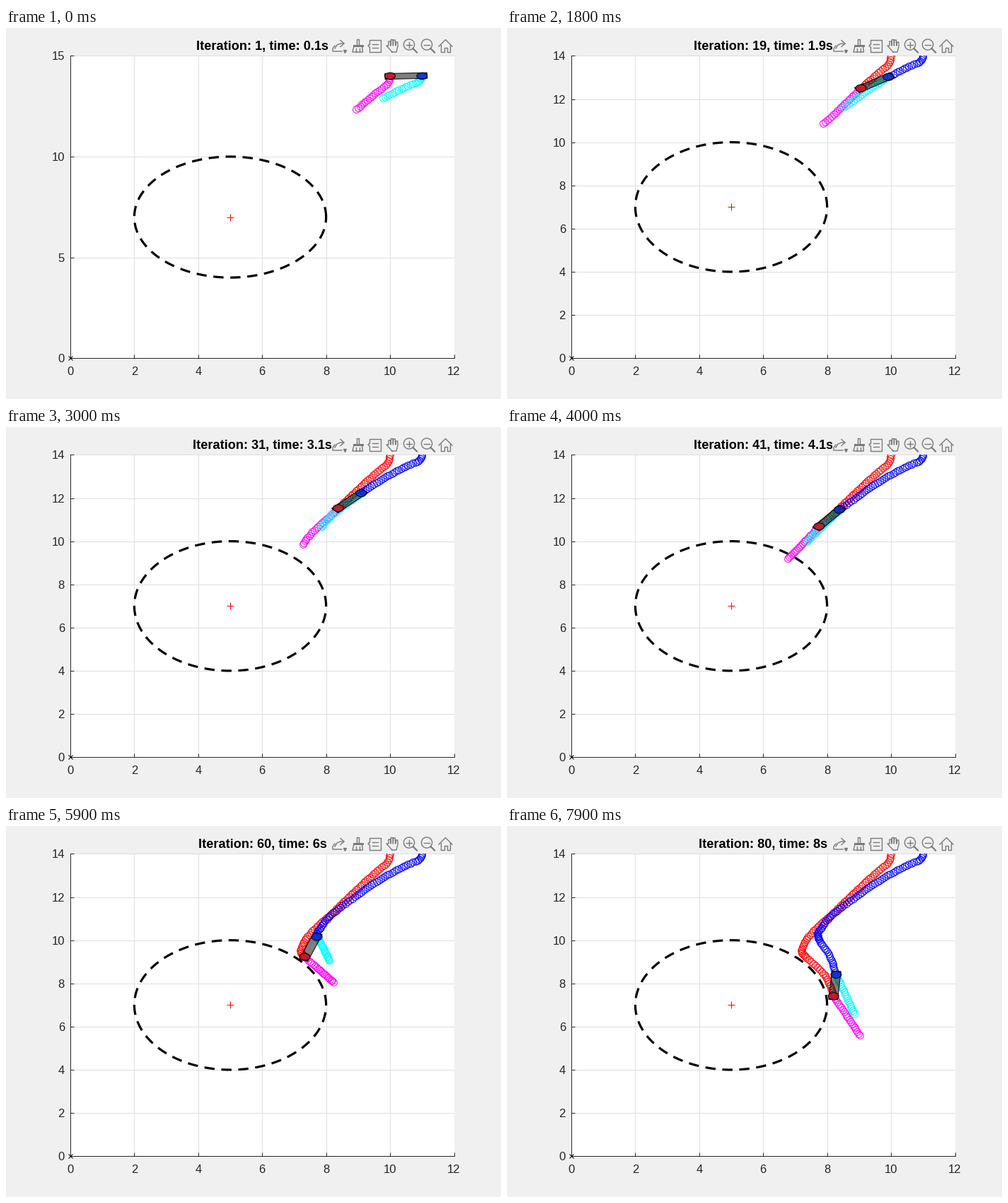
Animation of 700 by 525 pixels, one loop 8 s. Source, as a matplotlib script:

```python
import numpy as np
import matplotlib.pyplot as plt
from matplotlib.animation import FuncAnimation
from matplotlib.patches import Circle, Polygon, Rectangle

W, H, DPI = 700, 525, 100
PX = 72 / DPI  # points per pixel
LINE = 0.99 * PX
STEPS, HORIZON = 80, 20
BACK, INK, ICON = "#f0f0f0", "#262626", "#7a7a7a"
RADIUS, HALF_LENGTH, HALF_WIDTH = 0.165, 0.66, 0.14
plt.rcParams["font.family"] = "Liberation Sans"

# step, x, y of the front wheel
ROUTE = np.array([
    (0, 10, 14), (4, 9.92, 13.62), (9, 9.6, 13.22), (30, 8.38, 11.53),
    (50, 7.28, 9.85), (55, 7.2, 9.45), (59, 7.33, 9.23), (69, 7.93, 8.37),
    (79, 8.2, 7.41),
])


def front_at(t):
    """Cubic Hermite curve through the route."""
    t = np.atleast_1d(np.asarray(t, float))
    kt, kv = ROUTE[:, 0], ROUTE[:, 1:]
    slope = np.gradient(kv, kt, axis=0)
    i = np.clip(np.searchsorted(kt, t, side="right") - 1, 0, len(kt) - 2)
    h = (kt[i + 1] - kt[i])[:, None]
    u = (t - kt[i])[:, None] / h
    return ((2 * u**3 - 3 * u**2 + 1) * kv[i] + (u**3 - 2 * u**2 + u) * h * slope[i]
            + (3 * u**2 - 2 * u**3) * kv[i + 1] + (u**3 - u**2) * h * slope[i + 1])


def unit(angle):
    return np.stack([np.cos(angle), np.sin(angle)], axis=-1)


steps = np.arange(STEPS + 5)
front = front_at(steps)
# the rigid link swings round slowly, then once more beside the obstacle
link = np.radians(58 * np.tanh(steps / 30) + 28 / (1 + np.exp((60 - steps) / 3)))
rear = front + unit(link)


def plan(k):
    """Planned front and rear positions over the horizon."""
    if k <= 30:
        ahead = slice(k, k + HORIZON + 1)
        return front[ahead], rear[ahead]
    dx, dy = front[k + 4] - front[k + 2]
    heading = np.arctan2(dy, dx)
    reach = 2 - 1.45 * np.exp(-((k - 51) / 8)**2)  # short near the obstacle
    u = np.linspace(0, 1, HORIZON + 1)
    u *= 1 + (1 - reach / 2) * (1 - u)
    lead = front[k] + reach * u[:, None] * unit(heading)
    turn = (heading + np.pi - link[k]) / 2
    return lead, lead + unit(link[k] + turn * u)


def body_corners(k):
    mid = (front[k] + rear[k]) / 2
    along, side = unit(link[k + 1]), unit(link[k + 1] + np.pi / 2)
    return [mid + a * HALF_LENGTH * along + b * HALF_WIDTH * side
            for a, b in ((-1, -1), (1, -1), (1, 1), (-1, 1))]


fig = plt.figure(figsize=(W / DPI, H / DPI), dpi=DPI, facecolor=BACK)
ax = fig.add_axes([0.13, 0.11, 0.775, 0.815])
ax.set_xlim(0, 12)
ax.set_xticks(range(0, 13, 2))
ax.set_axisbelow(True)
ax.grid(color="#dedede", lw=LINE)
for name, spine in ax.spines.items():
    spine.set_visible(name in ("left", "bottom"))
    spine.set(color=INK, linewidth=LINE)
ax.tick_params(direction="in", length=5 * PX, width=LINE, color=INK,
               labelcolor=INK, labelsize=16.67 * PX)
ax.tick_params(axis="x", pad=12 * PX)
ax.tick_params(axis="y", pad=8 * PX)

# obstacle and origin
turn = np.linspace(0, 2 * np.pi, 400)
ax.plot(5 + 3 * np.cos(turn), 7 + 3 * np.sin(turn), color="k", lw=3.2 * PX,
        ls=(0, (4.5, 3)), dash_capstyle="butt", zorder=3)
ax.plot(5, 7, "+", color="red", ms=10 * PX, mew=LINE, zorder=3)
ax.plot(0, 0, "x", color="k", ms=6.5 * PX, mew=LINE, clip_on=False, zorder=3)


def rings(color, z):
    return ax.plot([], [], "o", mfc="none", mec=color, ms=9.8 * PX,
                   mew=LINE, clip_on=False, zorder=z)[0]


def wheel(rgb):
    return ax.add_patch(Circle((0, 0), RADIUS, fc=(*rgb, 0.7), ec="k",
                               lw=PX, clip_on=False, zorder=7))


trails = rings("red", 4), rings("blue", 4.1)
plans = rings("magenta", 5), rings("cyan", 5.1)
body = ax.add_patch(Polygon(np.zeros((4, 2)), fc=(0, 0, 0, 0.5), ec="k",
                            lw=LINE, clip_on=False, zorder=6))
wheels = wheel((0.9, 0.05, 0.08)), wheel((0.02, 0.12, 0.9))

# title and toolbar in pixel coordinates
top = fig.add_axes([0, 0, 1, 1], zorder=5)
top.set(xlim=(0, W), ylim=(H, 0))
top.axis("off")
title = top.text(362.5, 31, "", ha="center", va="baseline", weight="bold",
                 size=18.1 * PX, color="k", zorder=1)
top.add_patch(Rectangle((459.5, 13), 175, 25.5, fc=BACK, ec="none", zorder=2))


def stroke(*pts, lw=1.4):
    x, y = zip(*pts)
    top.plot(x, y, color=ICON, lw=lw * PX, zorder=3, solid_joinstyle="round")


def share():
    stroke((465, 25), (462, 29), (462, 33), (475, 33))
    stroke((465, 29), (468, 24), (473, 22), (478, 22))
    stroke((473, 17.5), (478, 22), (473, 26.5))
    top.plot(479, 32.5, "v", color=ICON, ms=4 * PX, zorder=3)


def brush():
    stroke((496, 24), (496, 16), (499, 16), (499, 24))
    stroke((492, 25), (504, 25), lw=3)
    stroke((492, 26), (490, 34), (504.5, 34), (503.5, 26))
    for x in (495, 500):
        stroke((x, 29), (x, 34))


def datatip():
    stroke((514, 23), (514, 16.5), (530, 16.5), (530, 34), (514, 34), (514, 27))
    stroke((514, 23), (512, 25), (514, 27))
    for y in (22.5, 27.5):
        stroke((518, y), (526, y))


def hand():
    outline = [(546, 34), (538, 25), (541, 25)]
    for i, tip in enumerate((19, 16.5, 17, 20)):
        x = 541 + 3.4 * i
        outline += [(x, tip), (x + 2.6, tip), (x + 3, 25)]
    stroke(*outline, (552, 34), (546, 34))


def lens(x, plus):
    top.add_patch(Circle((x, 23.5), 7.6, fc="none", ec=ICON, lw=1.4 * PX, zorder=3))
    stroke((x + 5.5, 29), (x + 11, 34.5), lw=2.2)
    stroke((x - 4, 23.5), (x + 4, 23.5))
    if plus:
        stroke((x, 19.5), (x, 27.5))


def home():
    stroke((612, 26), (621.5, 16.5), (631, 26))
    stroke((615, 24), (615, 34), (619.5, 34), (619.5, 28), (623.5, 28),
           (623.5, 34), (628, 34), (628, 24))


share()
brush()
datatip()
hand()
lens(570, True)
lens(595, False)
home()


def update(k):
    tall = rear[k, 1] + RADIUS > 14
    ax.set_ylim(0, 15 if tall else 14)
    ax.set_yticks(range(0, 16, 5) if tall else range(0, 15, 2))
    for pos, trail, ahead, dot, pts in zip((front, rear), trails, plans, wheels, plan(k)):
        trail.set_data(*pos[:k + 1].T)
        ahead.set_data(*pts.T)
        dot.center = pos[k]
    body.set_xy(body_corners(k))
    title.set_text(f"Iteration: {k + 1}, time: {(k + 1) / 10:g}s")
    return []


anim = FuncAnimation(fig, update, frames=STEPS, interval=100,
                     repeat=True, repeat_delay=0, blit=False)
plt.show()
```
